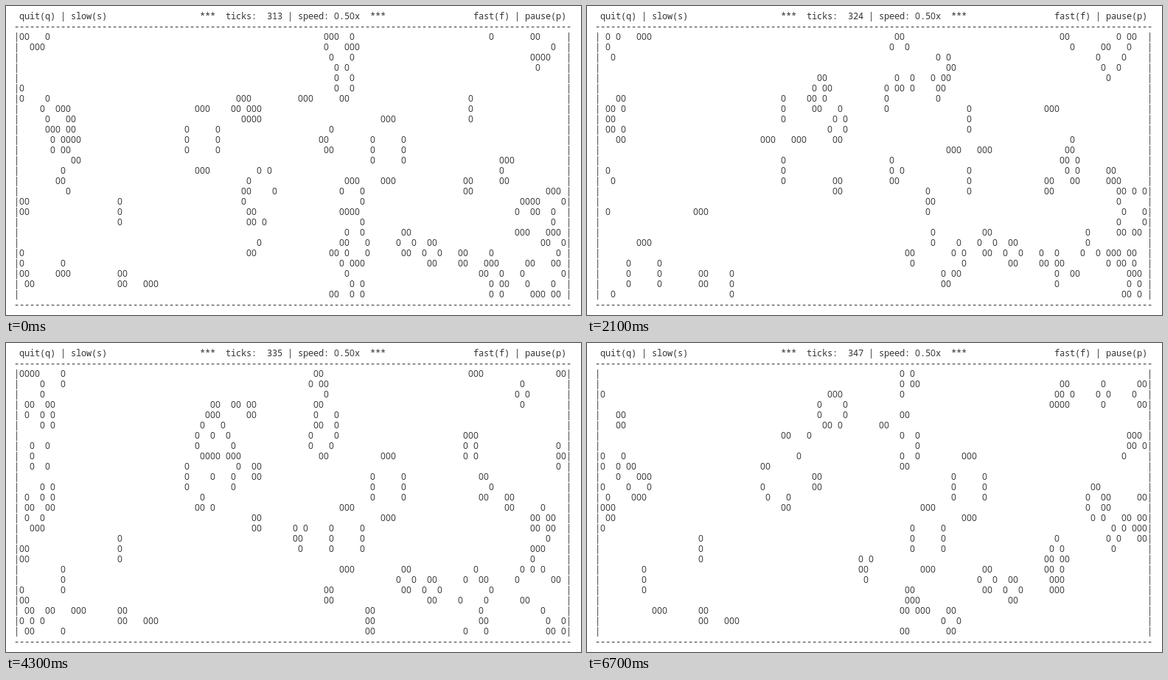
These frames come from a looping animation (780x420 px, 7 s). An HTML page:

```html
<!DOCTYPE html>
<html lang="en">
<head>
<meta charset="utf-8">
<title>Game of Life</title>
<style>
html, body { margin: 0; width: 100%; height: 100%; overflow: hidden; background: #fff; }
svg { display: block; width: 780px; height: 420px; }
text { white-space: pre; font: 12px "Noto Sans Mono", monospace; fill: #333; }
.zero { font-family: "Open Sans", "Noto Sans", sans-serif; }
</style>
</head>
<body>
<svg id="screen" viewBox="0 0 780 420"></svg>
<script>
const COLS = 106, ROWS = 26;
const FIRST = 313, LAST = 347, STEP = 200, LEAD = 100, LOOP = 7000;

const emptyBoard = () => Array.from({ length: ROWS }, () => Array(COLS).fill(0));
const start = emptyBoard();

// Places a small picture of live cells; the board is a torus.
function put(x, y, ...lines) {
  lines.forEach((line, j) => [...line].forEach((ch, i) => {
    if (ch === '0') start[(y + j) % ROWS][(x + i) % COLS] = 1;
  }));
}

const block = (x, y) => put(x, y, '00', '00');
const row3 = (x, y) => put(x, y, '000');
const col3 = (x, y) => put(x, y, '0', '0', '0');
const beehive = (x, y) => put(x, y, ' 00', '0  0', ' 00');
function trafficLight(x, y) {
  row3(x + 2, y);
  row3(x + 2, y + 6);
  col3(x, y + 2);
  col3(x + 6, y + 2);
}

trafficLight(32, 7);
trafficLight(68, 8);
beehive(73, 19);
beehive(78, 20);
block(0, 16);
block(19, 23);
block(86, 14);
block(85, 21);
row3(54, 6);
row3(24, 24);
col3(87, 6);
col3(19, 16);
put(0, 0, '00   0', '  000');
put(0, 5, '0', '0');
put(0, 21, '0', '0', '00', ' 00');
put(7, 22, ' 0', '000');
put(41, 6, ' 000', '00 000', '  0000');
put(58, 9, '  0', '00', ' 00');
put(93, 12, '000', '0', '00');
put(59, 0,
  '000  0',
  '0   000',
  ' 0   0',
  '  0 0',
  '  0  0',
  '  0  0',
  '   00');
put(4, 6,
  ' 0',
  '0  000',
  ' 0   00',
  ' 000 00',
  '  0 0000',
  '  0 00',
  '      00',
  '    0',
  '   00',
  '     0');
put(43, 13,
  '   0 0',
  ' 0',
  '00    0',
  '0',
  ' 00',
  ' 00 0',
  '',
  '   0',
  ' 00');
put(60, 14,
  '   000',
  '  0   0',
  '      0',
  '  0000',
  '      0',
  '   0  0',
  '  00   0',
  '00 0   0',
  '  0 000',
  '   0',
  '    0 0',
  '00  0 0');
put(89, 21,
  '  0',
  ' 000',
  '00  0',
  '  0 00',
  '  0 0',
  '  0');
put(96, 15,
  '      000',
  ' 0000    0',
  '0  00  0',
  '       0',
  '000   000',
  '     00  0',
  '        0',
  '  00   00',
  ' 0       0',
  '  0    0',
  '   000 00',
  '   00',
  '       0',
  '   0000',
  '    0');

function evolve(board) {
  const next = emptyBoard();
  for (let y = 0; y < ROWS; y++) {
    for (let x = 0; x < COLS; x++) {
      let near = -board[y][x];
      for (let dy = -1; dy <= 1; dy++) {
        for (let dx = -1; dx <= 1; dx++) {
          near += board[(y + dy + ROWS) % ROWS][(x + dx + COLS) % COLS];
        }
      }
      next[y][x] = near === 3 || (near === 2 && board[y][x]) ? 1 : 0;
    }
  }
  return next;
}

const boards = [start];
while (boards.length <= LAST - FIRST) boards.push(evolve(boards[boards.length - 1]));

// Terminal lines: every character sits on a 7 x 14 cell.
const svg = document.getElementById('screen');
const cellX = Array.from({ length: COLS + 2 }, (_, i) => 11 + 7 * i).join(' ');

function addText(line, cls) {
  const el = document.createElementNS('http://www.w3.org/2000/svg', 'text');
  el.setAttribute('x', cellX);
  el.setAttribute('y', 18 + 14 * line);
  el.setAttribute('class', cls);
  svg.appendChild(el);
  return el;
}

const lines = Array.from({ length: ROWS + 3 }, (_, i) => [addText(i, 'mono'), addText(i, 'zero')]);

// Zeros are plain, so they use a face without a slashed zero.
function print(line, str) {
  lines[line][0].textContent = str.replace(/0/g, ' ');
  lines[line][1].textContent = str.replace(/[^0]/g, ' ');
}

const rule = '-'.repeat(COLS + 2);
print(1, rule);
print(ROWS + 2, rule);

function show(n) {
  const status = `***  ticks:  ${FIRST + n} | speed: 0.50x  ***`;
  print(0, ' quit(q) | slow(s)'.padEnd(36) + status + 'fast(f) | pause(p)'.padStart(35));
  boards[n].forEach((cells, y) =>
    print(y + 2, '|' + cells.map(c => (c ? '0' : ' ')).join('') + '|'));
}

let shown = -1;
function frame() {
  const t = performance.now() % LOOP;
  const n = Math.min(LAST - FIRST, Math.floor((t + STEP - LEAD) / STEP));
  if (n !== shown) show(shown = n);
  requestAnimationFrame(frame);
}
frame();
</script>
</body>
</html>
```
